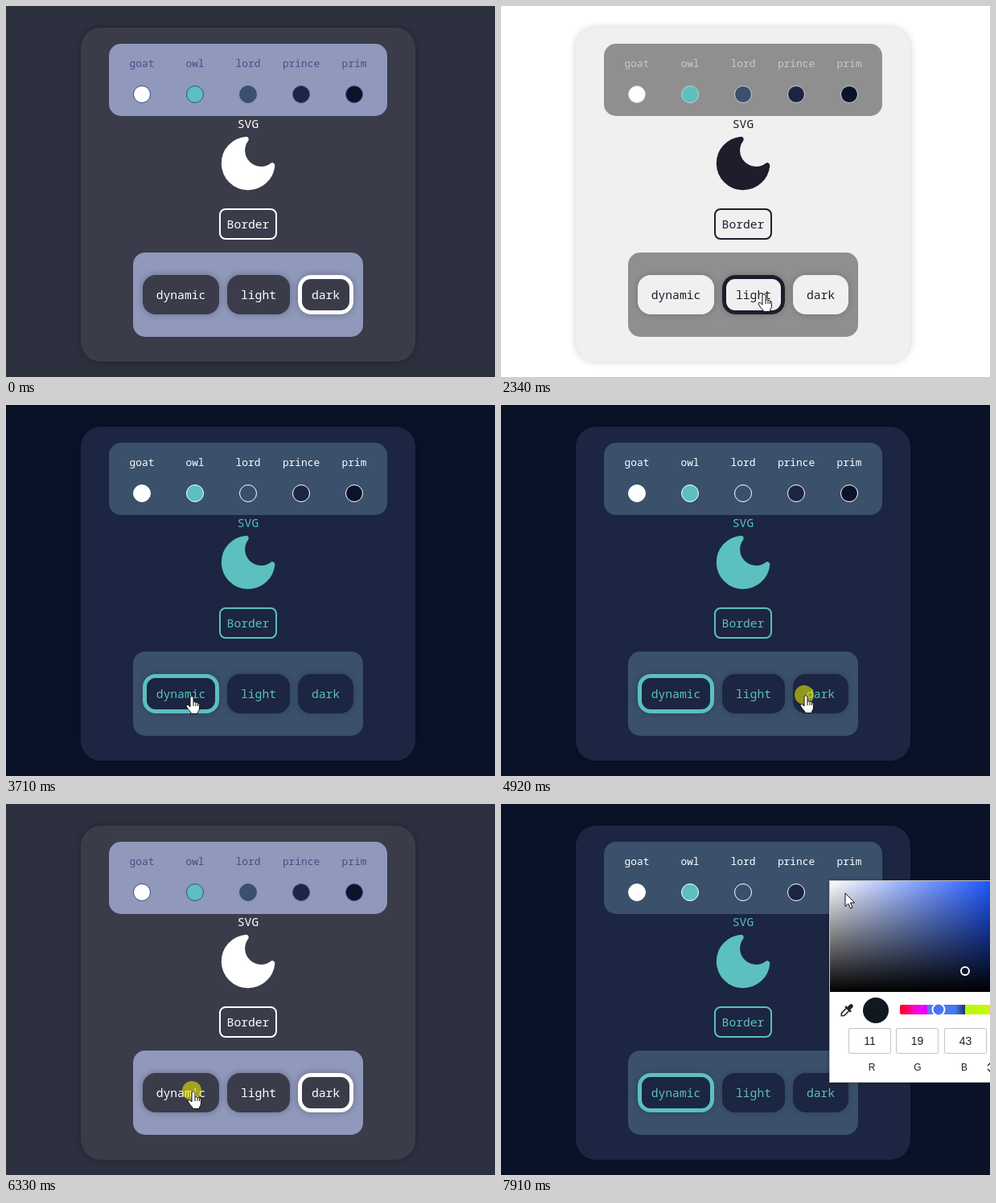
Animation, 608 px wide and 462 px high, one loop 8 s. Source, as an HTML page with a canvas:

```html
<!DOCTYPE html>
<html lang="en">
<head>
<meta charset="utf-8">
<title>Theme switcher</title>
<style>
  html, body { margin: 0; width: 100%; height: 100%; overflow: hidden; }
  canvas { display: block; width: 608px; height: 462px; }
</style>
</head>
<body>
<canvas id="stage" width="608" height="462"></canvas>
<script>
const ctx = document.getElementById('stage').getContext('2d');
const LOOP = 8000;
const STEP = 70;
const MONO = '"Noto Sans Mono", "DejaVu Sans Mono", monospace';
const SANS = '"Liberation Sans", Arial, sans-serif';

const themes = {
  dark: { bg: '#2d303e', card: '#3a3c4a', panel: '#9098bb', ink: '#ffffff', label: '#434f8a', rim: '#3f4c88', shadow: 'rgba(0,0,0,.28)' },
  light: { bg: '#ffffff', card: '#f0f0f0', panel: '#8f8f8f', ink: '#1f1d2b', label: '#c6cacc', rim: '#c8ccd2', shadow: 'rgba(0,0,0,.2)' },
  dynamic: { bg: '#0a1228', card: '#1c2541', panel: '#3a506b', ink: '#5bc0be', label: '#ffffff', rim: '#ffffff', shadow: 'rgba(0,0,0,.2)' }
};

const themeChanges = [[0, 'dark'], [1940, 'light'], [3710, 'dynamic'], [5050, 'dark'], [6460, 'dynamic']];

const swatches = [
  ['goat', '#ffffff'], ['owl', '#5bc0be'], ['lord', '#3a506b'], ['prince', '#1c2541'], ['prim', '#0b132b']
];

const buttons = [
  { name: 'dynamic', x: 170, w: 95 },
  { name: 'light', x: 275, w: 78 },
  { name: 'dark', x: 363, w: 69 }
];

// Each move follows a quadratic curve: start, control, end.
const moves = [
  { at: 720, steps: 10, path: [[495, 470], [420, 400], [330, 362]] },
  { at: 2340, steps: 1, path: [[330, 362], [328, 360], [325, 358]] },
  { at: 2750, steps: 7, path: [[352, 368], [310, 378], [229, 362]] },
  { at: 4240, steps: 8, path: [[229, 362], [300, 364], [377, 361]] },
  { at: 5380, steps: 11, path: [[377, 361], [300, 362], [231, 357]] },
  { at: 6670, steps: 12, path: [[231, 357], [390, 270], [427, 114]] },
  { at: 7640, steps: 1, path: [[427, 114], [427, 112], [428, 111]] }
];

const presses = [[1810, 1940], [2410, 2550], [3580, 3710], [4920, 5050], [6330, 6460], [7510, 7640]];
const PICKER_AT = 7640;

const moon = new Path2D('M21 12.79A9 9 0 1 1 11.21 3 7 7 0 0 0 21 12.79z');
const arrow = new Path2D('M0 0V16.5L3.8 13L6.5 19L9 18L6.4 12H11.6Z');
const hand = new Path2D('M0 2Q2-.8 4 2V8Q6 7 7 8.5Q9 7.8 9.5 9.5Q11.5 9 11.5 11.5V16Q11 19 9.5 20.5V22.5H1V21Q-3 17-5 13Q-5 10.5-2.5 11.5L0 14Z');
const knuckles = new Path2D('M4 8V13M7 9V13M9.5 10V13');

const lastBefore = (list, t, time) => list.filter(item => time(item) <= t).pop();

function box(x, y, w, h, r, fill, shadow, blur) {
  ctx.save();
  if (shadow) { ctx.shadowColor = shadow; ctx.shadowBlur = blur; }
  ctx.fillStyle = fill;
  ctx.beginPath();
  ctx.roundRect(x, y, w, h, r);
  ctx.fill();
  ctx.restore();
}

// The line lies inside the given outer edge.
function frame(x, y, w, h, r, line, color) {
  ctx.strokeStyle = color;
  ctx.lineWidth = line;
  ctx.beginPath();
  ctx.roundRect(x + line / 2, y + line / 2, w - line, h - line, Math.max(0, r - line / 2));
  ctx.stroke();
}

function disc(x, y, r, fill, line, stroke) {
  ctx.beginPath();
  ctx.arc(x, y, r, 0, Math.PI * 2);
  ctx.fillStyle = fill;
  ctx.fill();
  if (!line) return;
  ctx.lineWidth = line;
  ctx.strokeStyle = stroke;
  ctx.stroke();
}

function text(str, x, y, size, color, family = MONO) {
  ctx.font = `${size}px ${family}`;
  ctx.textAlign = 'center';
  ctx.fillStyle = color;
  ctx.fillText(str, x, y);
}

function gradient(x0, y0, x1, y1, stops) {
  const g = ctx.createLinearGradient(x0, y0, x1, y1);
  stops.forEach(([offset, color]) => g.addColorStop(offset, color));
  return g;
}

function drawMoon(color) {
  ctx.save();
  ctx.translate(261, 156);
  ctx.scale(80 / 24, 80 / 24);
  ctx.fillStyle = ctx.strokeStyle = color;
  ctx.lineWidth = 2;
  ctx.lineJoin = 'round';
  ctx.fill(moon);
  ctx.stroke(moon);
  ctx.restore();
}

function drawPage(name) {
  const c = themes[name];
  ctx.fillStyle = c.bg;
  ctx.fillRect(0, 0, 608, 462);
  box(93, 27, 416, 416, 25, c.card, c.shadow, 10);

  box(128, 47, 346, 90, 15, c.panel);
  swatches.forEach(([label, color], i) => {
    const x = 169 + i * 66;
    text(label, x, 76, 12.83, c.label);
    disc(x, 110, 10.5, color, 1, c.rim);
  });

  text('SVG', 301, 152, 14.67, c.ink);
  drawMoon(c.ink);
  frame(265, 252, 72, 39, 8, 2, c.ink);
  text('Border', 301, 277, 14.67, c.ink);

  box(158, 307, 286, 105, 15, c.panel);
  for (const b of buttons) {
    box(b.x, 335, b.w, 49, 16, c.card, c.shadow, 8);
    if (b.name === name) frame(b.x, 335, b.w, 49, 16, 5, c.ink);
    text(b.name, b.x + b.w / 2, 365, 14.67, c.ink);
  }
}

function drawDropper() {
  ctx.save();
  ctx.translate(430, 257);
  ctx.rotate(Math.PI / 4);
  box(-2.5, -10, 5, 8, 2.5, '#202124');
  box(-5, -3.5, 10, 2.5, 1, '#202124');
  ctx.strokeStyle = '#202124';
  ctx.lineWidth = 1.6;
  ctx.beginPath();
  ctx.moveTo(-2.3, -1);
  ctx.lineTo(-2.3, 7);
  ctx.lineTo(0, 9.5);
  ctx.lineTo(2.3, 7);
  ctx.lineTo(2.3, -1);
  ctx.stroke();
  ctx.restore();
}

function drawPicker() {
  box(408, 95, 232, 252, 0, '#ffffff', 'rgba(0,0,0,.3)', 4);
  frame(408, 95, 232, 252, 0, 1, '#c4c4c4');

  const shades = [
    gradient(409, 0, 635, 0, [[0, '#ffffff'], [1, '#0040ff']]),
    gradient(0, 96, 0, 234, [[0, 'rgba(0,0,0,0)'], [1, '#000000']])
  ];
  for (const shade of shades) {
    ctx.fillStyle = shade;
    ctx.fillRect(409, 96, 226, 138);
  }
  disc(577, 208, 6.5, '#000000');
  disc(577, 208, 5, '#0b132b', 2, '#ffffff');

  drawDropper();
  disc(466, 257, 16, '#101822');
  box(496, 250, 128, 12, 2, gradient(496, 0, 624, 0, [
    [0, '#ff0020'], [.08, '#ff0060'], [.13, '#ff00c0'], [.2, '#f400ff'], [.26, '#e000ff'], [.27, '#6a70f0'],
    [.38, '#4878f8'], [.54, '#4878f0'], [.63, '#203468'], [.635, '#b8f800'], [.85, '#c0ff00'], [.86, '#ffe800'], [1, '#ff4000']
  ]));
  disc(544, 256, 7.5, '#4474f0', 2, '#ffffff');

  [['11', 'R', 432, 461], ['19', 'G', 491, 518], ['43', 'B', 551, 576]].forEach(([value, channel, x, labelX]) => {
    frame(x, 279, 53, 32, 2, 1, '#c4c4c4');
    text(value, x + 26.5, 300, 14, '#202124', SANS);
    text(channel, labelX, 332, 12, '#202124', SANS);
  });
  ctx.strokeStyle = '#202124';
  ctx.lineWidth = 1.3;
  ctx.beginPath();
  for (const dir of [-1, 1]) {
    ctx.moveTo(605, 328 + dir * 2);
    ctx.lineTo(608, 328 + dir * 5);
    ctx.lineTo(611, 328 + dir * 2);
  }
  ctx.stroke();
}

function pointerAt(t) {
  const move = lastBefore(moves, t, m => m.at);
  if (!move) return null;
  const done = Math.min(1, (Math.floor((t - move.at) / STEP) + 1) / move.steps);
  const s = Math.sin(done * Math.PI / 2);
  const [a, b, c] = move.path;
  return [0, 1].map(i => Math.round((1 - s) ** 2 * a[i] + 2 * s * (1 - s) * b[i] + s * s * c[i]));
}

function drawPointer(t) {
  const point = pointerAt(t);
  if (!point) return;
  const [x, y] = point;
  if (presses.some(([from, to]) => t >= from && t < to)) disc(x, y, 12, 'rgba(250,245,0,.55)');

  const overButton = y >= 335 && y < 384 && buttons.some(b => x >= b.x && x < b.x + b.w);
  const shape = overButton ? hand : arrow;
  ctx.save();
  ctx.translate(x, y);
  ctx.lineJoin = 'round';
  ctx.lineWidth = 1;
  ctx.strokeStyle = '#111111';
  ctx.fillStyle = '#ffffff';
  ctx.fill(shape);
  ctx.stroke(shape);
  if (overButton) ctx.stroke(knuckles);
  ctx.restore();
}

function render(now) {
  const t = now % LOOP;
  drawPage(lastBefore(themeChanges, t, change => change[0])[1]);
  if (t >= PICKER_AT) drawPicker();
  drawPointer(t);
}

const start = performance.now();
function tick() {
  render(performance.now() - start);
  requestAnimationFrame(tick);
}
tick();
</script>
</body>
</html>
```
